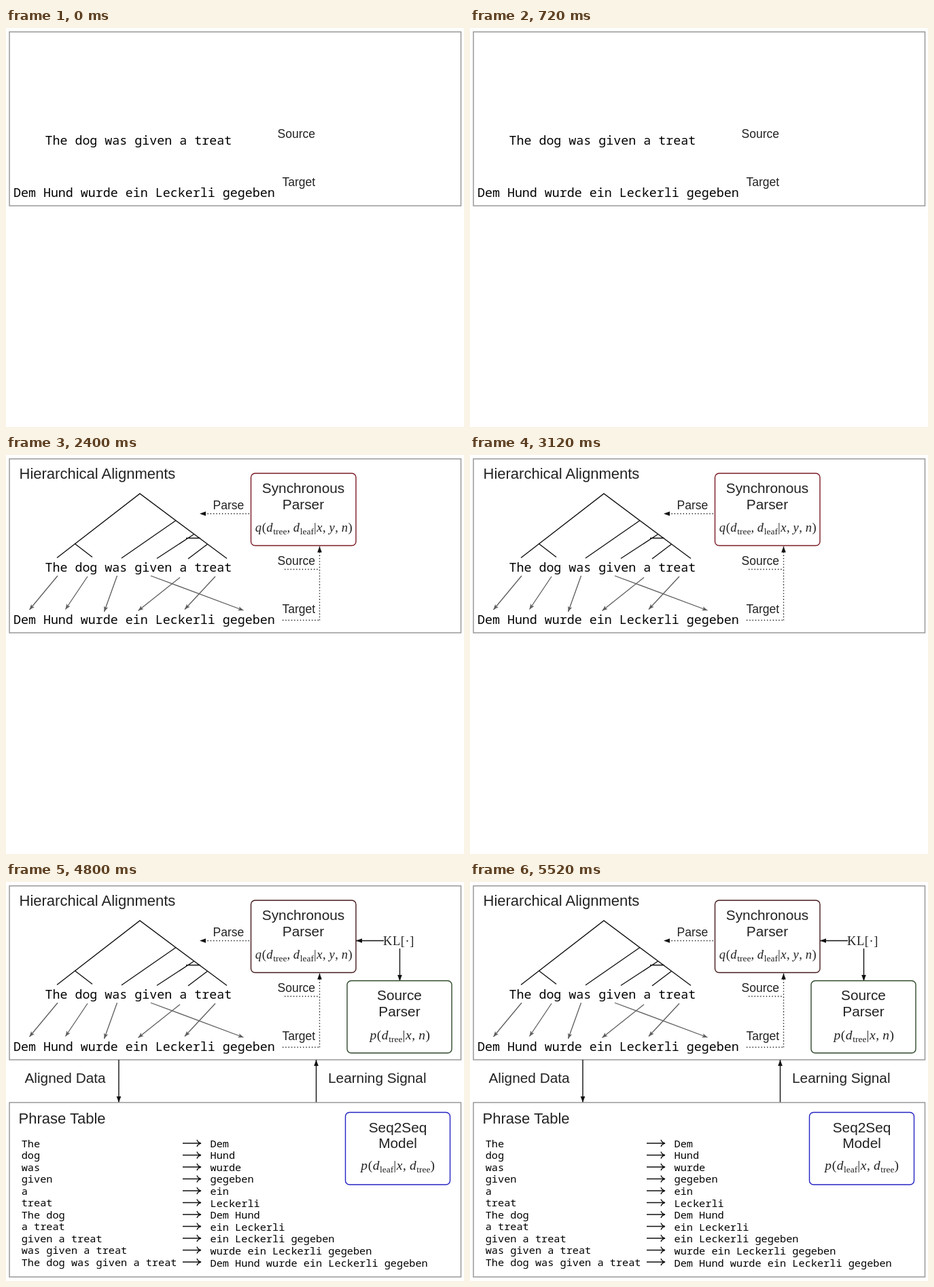
An HTML page for the animation above (6000 ms loop, 674x588 px).

```html
<!DOCTYPE html>
<html lang="en">
<head>
<meta charset="utf-8">
<title>Hierarchical alignments</title>
<style>
  html, body { margin: 0; width: 100%; height: 100%; overflow: hidden; background: #fff; }
  svg { display: block; }
  text { font: 20.8px "Liberation Sans", Arial, sans-serif; fill: #222; white-space: pre; }
  .title { font-size: 22px; }
  .label { font-size: 17.5px; }
  .mid { text-anchor: middle; }
  .mono { font: 18.33px "Noto Sans Mono", monospace; fill: #000; }
  .row { font-size: 15.25px; }
  .math { font: 18.5px "Liberation Serif", serif; letter-spacing: .03em; text-anchor: middle; }
  .it { font-style: italic; }
  .sub { font-size: 13.5px; letter-spacing: 0; }
  path, rect { fill: none; stroke: #111; stroke-width: 1.4; }
  .frame { stroke: #999; stroke-width: 1.5; }
  .dots { stroke-dasharray: 1.3 3; }
  .align { stroke: #5c5c5c; stroke-width: 1.3; marker-end: url(#grey); }
  .arrow { marker-end: url(#black); }
  marker path { stroke: none; fill: #111; }
  #grey path { fill: #5c5c5c; }
</style>
</head>
<body>
<svg width="674" height="588" viewBox="0 0 674 588">
  <defs>
    <marker id="black" markerUnits="userSpaceOnUse" markerWidth="9" markerHeight="8" refX="9" refY="4" orient="auto"><path d="M0 .7L9 4L0 7.3z"/></marker>
    <marker id="grey" markerUnits="userSpaceOnUse" markerWidth="9" markerHeight="8" refX="9" refY="4" orient="auto"><path d="M1 .8L9 4L1 7.2L3 4z"/></marker>
  </defs>

  <g data-step="0">
    <rect class="frame" x="5" y="5.7" width="664.5" height="256.3"/>
    <text class="mono" x="57.4" y="172">The dog was given a treat</text>
    <text class="mono" x="10.9" y="249">Dem Hund wurde ein Leckerli gegeben</text>
    <text class="label" x="399.5" y="162">Source</text>
    <text class="label" x="406.5" y="232.5">Target</text>
  </g>

  <g data-step="1">
    <rect id="parser" x="360.5" y="27" width="154.5" height="106.5" rx="6"/>
    <text class="mid" x="437.5" y="55.5">Synchronous</text>
    <text class="mid" x="437.5" y="79.5">Parser</text>
    <text class="math" x="438.5" y="112.5" data-math="q(d_tree, d_leaf|x, y, n)"></text>
    <path class="dots" d="M410 168.5H461M407 243.5H461.5"/>
    <path class="dots arrow" d="M461.5 243.5V134.5"/>
  </g>

  <g data-step="2">
    <text class="title" x="19.5" y="35">Hierarchical Alignments</text>
    <text class="label" x="304.5" y="80">Parse</text>
    <path class="dots arrow" d="M358 86.5H285"/>
    <path d="M75 151.5L197 57L325 152.5M101 130.5L127 150.5M250 96.5L170 152M277 116.5L222 152.5M265 122.5H286M297 131L268 153"/>
    <path class="align" d="M76 178L34.5 228"/>
    <path class="align" d="M120 179L87.5 227.5"/>
    <path class="align" d="M163.5 178L144.5 231"/>
    <path class="align" d="M213 178L349.5 229"/>
    <path class="align" d="M256 180.5L194.5 229.5"/>
    <path class="align" d="M308 179L263 227.5"/>
  </g>

  <g data-step="3">
    <path class="arrow" d="M166 262V325"/>
    <path class="arrow" d="M456.5 325V262"/>
    <text x="27.5" y="296">Aligned Data</text>
    <text x="474" y="296">Learning Signal</text>
    <rect class="frame" x="5" y="325" width="664.5" height="257"/>
    <text class="title" x="18.5" y="356">Phrase Table</text>
    <rect x="499.5" y="339.5" width="154" height="106.5" rx="6" style="stroke:#2424c4"/>
    <text class="mid" x="576.5" y="368.5">Seq2Seq</text>
    <text class="mid" x="576.5" y="392">Model</text>
    <text class="math" x="577" y="424" style="font-size:19.5px" data-math="p(d_leaf|x, d_tree)"></text>
    <g id="table"></g>
  </g>

  <g data-step="4">
    <path class="arrow" d="M556 86.5H515"/>
    <path class="arrow" d="M579.5 98V146"/>
    <text class="math" x="578" y="92.5">KL[·]</text>
    <rect x="502" y="145.5" width="154" height="106.5" rx="6" style="stroke:#2f4a2a"/>
    <text class="mid" x="579" y="174">Source</text>
    <text class="mid" x="579" y="198">Parser</text>
    <text class="math" x="580" y="232" style="font-size:19.5px" data-math="p(d_tree|x, n)"></text>
  </g>
</svg>
<script>
const STEP = 1200, STEPS = 5;
const groups = [...document.querySelectorAll("[data-step]")];
const parser = document.getElementById("parser");

// Letters become italic variables, _word becomes a subscript, ", " gets a thin space.
function mathMarkup(source) {
  let drop = 0;
  return source.match(/_[a-z]+|, |./g).map(token => {
    const sub = token[0] === "_";
    const dy = (sub ? 4 : 0) - drop;
    drop += dy;
    const kind = sub ? "sub" : /[a-z]/.test(token) ? "it" : "";
    const body = sub ? token.slice(1) : token === ", " ? ",\u2009" : token;
    return `<tspan class="${kind}" dy="${dy}">${body}</tspan>`;
  }).join("");
}
for (const el of document.querySelectorAll("[data-math]"))
  el.innerHTML = mathMarkup(el.dataset.math);

const phrases = [
  ["The", "Dem"], ["dog", "Hund"], ["was", "wurde"], ["given", "gegeben"],
  ["a", "ein"], ["treat", "Leckerli"], ["The dog", "Dem Hund"],
  ["a treat", "ein Leckerli"], ["given a treat", "ein Leckerli gegeben"],
  ["was given a treat", "wurde ein Leckerli gegeben"],
  ["The dog was given a treat", "Dem Hund wurde ein Leckerli gegeben"]
];
document.getElementById("table").innerHTML = phrases.map(([from, to], i) => {
  const y = 390.5 + 17.5 * i;
  return `<text class="mono row" x="22.7" y="${y}">${from}</text>
    <path d="M260 ${y - 5.5}H287m-6 -5q1.5 4 6 5q-4.5 1 -6 5"/>
    <text class="mono row" x="300.5" y="${y + i * 0.1}">${to}</text>`;
}).join("");

function draw() {
  const step = Math.floor(performance.now() / STEP) % STEPS;
  for (const g of groups)
    g.style.display = g.dataset.step <= step ? "" : "none";
  parser.style.stroke = step < 3 ? "#7a1c25" : "#451a1d";
  requestAnimationFrame(draw);
}
draw();
</script>
</body>
</html>
```
